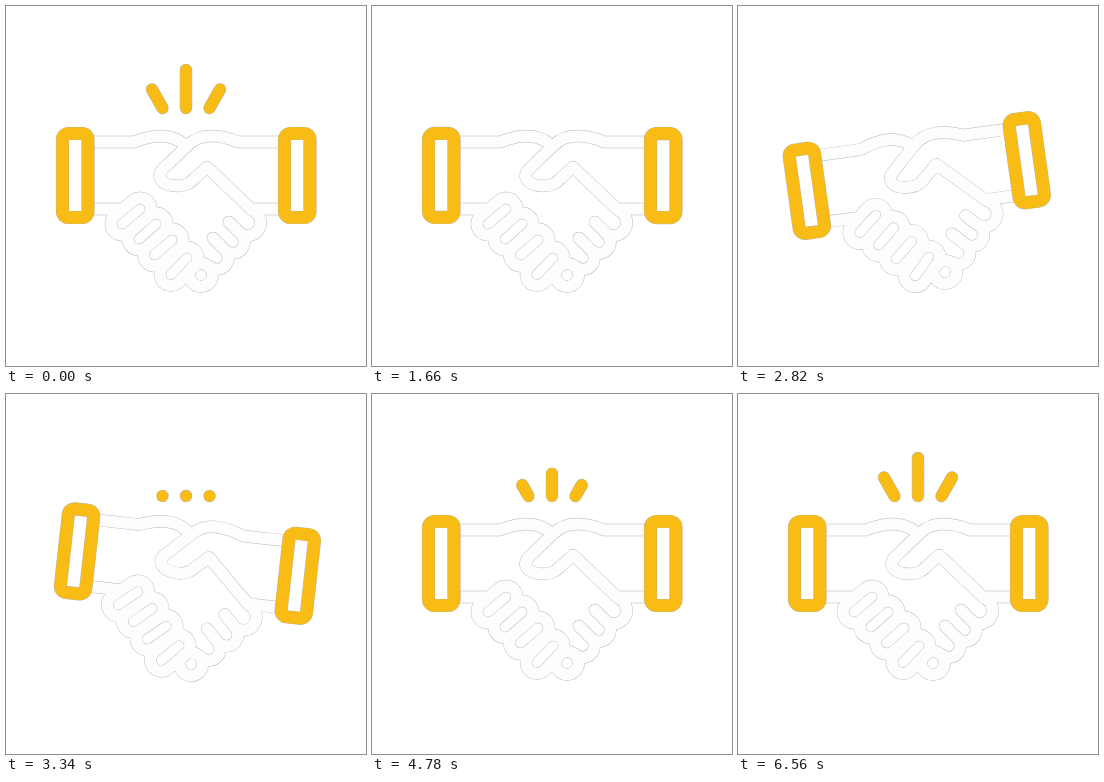
Animation, 360 px wide and 360 px high, one loop 7.08 s. Source, as an HTML page with a canvas:

```html
<!DOCTYPE html>
<html lang="en">
<head>
<meta charset="utf-8">
<title>Handshake</title>
<style>
  html, body { margin: 0; width: 100%; height: 100%; overflow: hidden; background: #fff; }
  canvas { display: block; width: 360px; height: 360px; }
</style>
</head>
<body>
<canvas id="stage"></canvas>
<script>
const LOOP = 7080, SIZE = 360, LINE = 12;
const YELLOW = '#f9bc15', PALE = '#fdfdfd', EDGE = '#b4b4b4';

const canvas = document.getElementById('stage');
const ctx = canvas.getContext('2d');
const ratio = window.devicePixelRatio || 1;
canvas.width = canvas.height = SIZE * ratio;

// Each track is a list of [time in ms, value], eased between entries.
const angle = [[1640, 0], [2370, 8], [2800, -8], [3245, 8], [3700, -8], [4240, 0]];
const dip = [[20, 0], [780, 8.5], [1540, 0]];
const rayLength = [[820, 1], [1480, 0], [3400, 0], [4120, 1], [4480, 1], [5160, 0], [5620, 0], [6480, 1]];
const raySize = [[1400, 1], [1540, 0], [3040, 0], [3300, 1]];

function valueAt(track, t) {
  const next = track.findIndex(([time]) => time > t);
  if (next === 0) return track[0][1];
  if (next < 0) return track[track.length - 1][1];
  const [t0, a] = track[next - 1], [t1, b] = track[next];
  return a + (b - a) * (1 - Math.cos(Math.PI * (t - t0) / (t1 - t0))) / 2;
}

function addCapsule(path, x1, y1, x2, y2, r) {
  const a = Math.atan2(y2 - y1, x2 - x1), q = Math.PI / 2;
  const capsule = new Path2D();
  capsule.arc(x2, y2, r, a - q, a + q);
  capsule.arc(x1, y1, r, a + q, a + 3 * q);
  capsule.closePath();
  path.addPath(capsule);
}

const hands = new Path2D(
  // left arm
  'M86 136H128C136 133 143 130 155 130C165 130 172 133 179 139 M86 203H117' +
  // right arm and thumb
  'M274 136H232C223 132 216 130 205 130C195 130 188 133 182 139L157 163' +
  'C149 171 156 180 172 180C180 180 184 177 189 172L201 161L246 204 M274 203H245' +
  // right fingers
  'M248 205A12 12 0 0 1 235 228A11.3 11.3 0 0 1 219 244A11.3 11.3 0 0 1 203 260' +
  'M235 228L223 216 M219 244L207 232'
);
[[116, 218, 134, 203], [133, 233, 150, 218], [148.5, 249, 166, 234], [165, 268.5, 181, 252]]
  .forEach(finger => addCapsule(hands, ...finger, 11));
addCapsule(hands, 195, 269, 195, 269, 11.5);

const cuffs = new Path2D();
for (const x of [56.5, 278.5]) cuffs.roundRect(x, 127.5, 25.5, 84, 6);

function strokeShape(path, color, width) {
  ctx.lineWidth = width + 0.4;
  ctx.strokeStyle = EDGE;
  ctx.stroke(path);
  ctx.lineWidth = width - 0.4;
  ctx.strokeStyle = color;
  ctx.stroke(path);
}

function drawRays(length, size) {
  if (size <= 0.04) return;
  const rays = new Path2D();
  for (const [x, dx, dy] of [[156.5, -10.5, -18.5], [180, 0, -38], [203.5, 10.5, -18.5]]) {
    rays.moveTo(x, 102);
    rays.lineTo(x + dx * length, 102 + dy * length - 0.01);
  }
  strokeShape(rays, YELLOW, LINE * size);
}

function draw(now) {
  const t = now % LOOP;
  ctx.setTransform(ratio, 0, 0, ratio, 0, 0);
  ctx.fillStyle = '#fff';
  ctx.fillRect(0, 0, SIZE, SIZE);
  ctx.lineCap = ctx.lineJoin = 'round';

  drawRays(valueAt(rayLength, t), valueAt(raySize, t));

  ctx.translate(180, 180 + valueAt(dip, t));
  ctx.rotate(valueAt(angle, t) * Math.PI / 180);
  ctx.translate(-180, -180);
  strokeShape(hands, PALE, LINE);
  strokeShape(cuffs, YELLOW, LINE + 0.8);
}

const start = performance.now();
function tick() {
  draw(performance.now() - start);
  requestAnimationFrame(tick);
}
tick();
</script>
</body>
</html>
```
